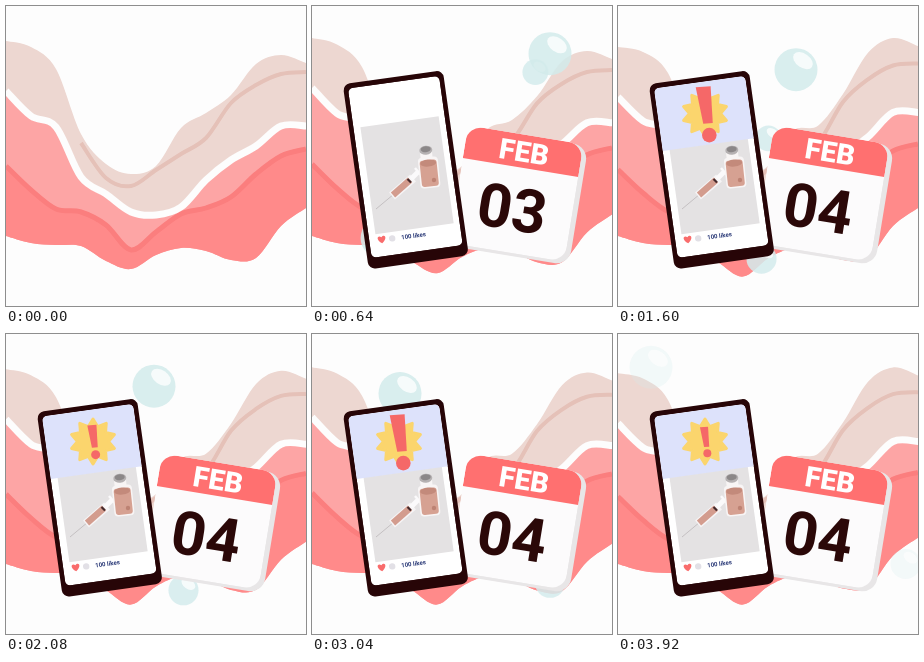
An HTML page for the animation above (4000 ms loop, 300x300 px).

```html
<!DOCTYPE html>
<html lang="en">
<head>
<meta charset="utf-8">
<title>Calendar and phone</title>
<style>
html, body { margin: 0; width: 100%; height: 100%; overflow: hidden; background: #fdfdfd; }
svg { display: block; width: 100vw; height: 100vh; }
text { font-family: Roboto, Arial, sans-serif; font-weight: 700; }
</style>
</head>
<body>
<svg viewBox="0 0 300 300">
  <defs>
    <clipPath id="screen"><rect x="-46" y="-88" width="92" height="171" rx="5"/></clipPath>
    <clipPath id="card"><rect x="-58" y="-61" width="117" height="119" rx="15"/></clipPath>
    <filter id="soft" x="-20%" y="-20%" width="140%" height="140%"><feGaussianBlur id="blur" stdDeviation="0"/></filter>
    <g id="bubble">
      <circle r="21.500" fill="#d3ebec" fill-opacity=".85"/>
      <ellipse cx="7" cy="-9" rx="11" ry="7" fill="#fff" opacity=".75" transform="rotate(35 7 -9)"/>
    </g>
  </defs>
  <rect width="300" height="300" fill="#fdfdfd"/>
  <g fill="none">
    <path id="beige" fill="#edd7d1"/>
    <path id="beigeLine" stroke="#e5c1b8" stroke-width="4"/>
    <path id="pink" fill="#fda5a5"/>
    <path id="coral" fill="#ff8a8a"/>
    <path id="coralLine" stroke="#fb7e7e" stroke-width="5"/>
    <path id="gap" stroke="#fdfdfd" stroke-width="7"/>
  </g>
  <use id="bubC" href="#bubble"/>
  <use id="bubB" href="#bubble"/>
  <use id="bubA" href="#bubble"/>

  <g id="cal">
    <g transform="translate(203.5 189) rotate(9.3)">
      <rect x="-56" y="-60" width="120" height="121" rx="15" fill="#e8e6e7"/>
      <g clip-path="url(#card)">
        <rect x="-58" y="-61" width="117" height="119" fill="#fcfbfc"/>
        <rect x="-58" y="-61" width="117" height="33" fill="#ff7070"/>
      </g>
      <text x="1.500" y="-34" font-size="28.500" text-anchor="middle" fill="#fff" style="font-weight:900">FEB</text>
      <text id="day" x="-1" y="35" font-size="60.500" text-anchor="middle" fill="#2b0808">03</text>
    </g>
  </g>

  <g id="phone">
    <g transform="translate(93.7 163.3) rotate(-8)">
      <rect x="-50.5" y="-93" width="101" height="187" rx="7" fill="#270507"/>
      <g clip-path="url(#screen)">
        <rect x="-46" y="-88" width="92" height="171" fill="#fff"/>
        <rect x="-39" y="-48" width="79" height="108" fill="#e4e2e3"/>
        <rect id="panel" x="-46" y="-88" width="92" height="63" fill="#dde2fb"/>
      </g>
      <path d="M-33.500 70C-40.500 65-36.500 60.500-33.500 64C-30.500 60.500-26.500 65-33.500 70" fill="#f96c6c"/>
      <circle cx="-23" cy="66.500" r="3.200" fill="#e2e0e6"/>
      <text x="-14" y="69" font-size="6.100" fill="#2b3a78">100 likes</text>
    </g>
    <g fill="none">
      <path d="M64 203L82 188" stroke="#c4c0c2" stroke-width="1"/>
      <path d="M80 190L101 172" stroke="#f6f4f5" stroke-width="9"/>
      <path d="M81 189L98 174" stroke="#d39c8e" stroke-width="6.500"/>
      <path d="M96.500 175.500L98 174" stroke="#43292b" stroke-width="5"/>
      <path d="M99 173L106 166" stroke="#fbfafb" stroke-width="5"/>
      <path d="M103 162L109 169" stroke="#fbfafb" stroke-width="2.500"/>
    </g>
    <g transform="rotate(-6 117 165)">
      <rect x="107" y="151" width="20" height="31" rx="4" fill="#f8f5f5"/>
      <rect x="110" y="143" width="12" height="10" fill="#f8f5f5"/>
      <rect x="108.500" y="154" width="17" height="26.500" rx="3" fill="#d6a192"/>
      <ellipse cx="117" cy="157" rx="8" ry="3.500" fill="#c38a7b"/>
      <circle cx="121" cy="174.500" r="2.200" fill="#bd8273"/>
      <ellipse cx="116" cy="144" rx="6.500" ry="4.500" fill="#b5b1b2"/>
      <ellipse cx="116" cy="143" rx="5" ry="3" fill="#8b8788"/>
    </g>
    <g id="badge">
      <path id="burst" fill="#fbd56d" stroke="#fbd56d" stroke-width="3" stroke-linejoin="round"/>
      <g id="mark" fill="#f56868">
        <path d="M-4.300-12.500L2.600-13L3.600 4L-.8 4.400Z"/>
        <circle cx="2" cy="9.600" r="3.400"/>
      </g>
    </g>
  </g>
</svg>
<script>
const LOOP = 4000, STEP = 80, GRID = 25;
const { sin, cos, exp, min, max, PI } = Math;
const $ = id => document.getElementById(id);
const set = (id, name, value) => $(id).setAttribute(name, value);
const clamp = v => max(0, min(1, v));
const ease = (a, b, t) => { const u = clamp((t - a) / (b - a)); return u * u * (3 - 2 * u); };

// Heights of each edge at even steps across the stage
const edge = (from, ...ys) => ys.map((y, i) => [from + i * GRID, y]);
const top0 = edge(0, 35, 41, 63, 128, 158, 168, 160, 122, 107, 89, 58, 49, 57);
const vein0 = edge(75, 137, 172, 180, 164, 148, 132, 97, 79, 68, 66);
const gap0 = edge(0, 85, 110, 121, 171, 188, 206, 209, 201, 174, 154, 140, 120, 120);
const fold0 = edge(0, 160, 184, 203, 206, 219, 244, 226, 208, 202, 191, 168, 150, 143);
const low0 = edge(0, 230, 237, 239, 240, 255, 263, 249, 242, 245, 254, 252, 220, 202);

// Smooth curve through evenly spaced points
function curve(p) {
  let d = '';
  for (let i = 0; i < p.length - 1; i++) {
    const a = p[max(0, i - 1)], b = p[i], c = p[i + 1], e = p[min(p.length - 1, i + 2)];
    const n = [b[0] + (c[0] - a[0]) / 6, b[1] + (c[1] - a[1]) / 6,
      c[0] - (e[0] - b[0]) / 6, c[1] - (e[1] - b[1]) / 6, ...c];
    d += 'C' + n.map(v => v.toFixed(2)).join(' ');
  }
  return d;
}
const line = p => 'M' + p[0] + curve(p);
const band = (a, b) => {
  const back = [...b].reverse();
  return line(a) + 'L' + back[0] + curve(back) + 'Z';
};

function waves(t) {
  const grow = ease(0, 1.2, t), sway = sin(3 * t) * grow;
  const bend = (pts, left, mid, right, center = 203) => pts.map(([x, y]) => [x, y
    + left * clamp(1 - x / 150) + right * clamp((x - 200) / 75)
    + mid * exp(-(((x - center) / 22) ** 2))]);
  const left = -6 * sway, right = 5 * sway - 12 * grow;
  const top = bend(top0, left, 13 * grow, right);
  const gap = bend(gap0, left, 0, right * .8);
  const fold = bend(fold0, left * .6, 0, right * .3);
  const low = bend(low0, 0, 8 * grow, 6 * (grow + sway), 130);
  set('beige', 'd', band(top, gap));
  set('beigeLine', 'd', line(bend(vein0, 0, 5 * grow, right * .5)));
  set('pink', 'd', band(gap, low));
  set('coral', 'd', band(fold, low));
  set('coralLine', 'd', line(fold));
  set('gap', 'd', line(gap));
}

function bubble(id, x, y, scale, opacity) {
  set(id, 'transform', `translate(${x} ${y}) scale(${scale})`);
  set(id, 'opacity', opacity);
}

function bubbles(t) {
  const fade = ease(.04, .4, t) * (1 - ease(3.6, 4.1, t));
  const arc = sin(t * PI / 4);
  bubble('bubA', 278 - 62.5 * t, 32 + 30 * arc + 11 * cos((t - 1.15) / 2.2 * 2 * PI), 1, fade);
  bubble('bubB', 16 + 69 * t + 18 * arc, 212 + 4 * t + 36 * arc, 1 - .3 * ease(.3, 1.5, t), fade);
  bubble('bubC', 272 - 76 * t, 22 + 69 * t, .6, fade * (1 - ease(1.8, 2.1, t)));
}

function enter(id, dx, dy, gain, t) {
  const p = ease(.08, .56, t), rest = 1 - p;
  set(id, 'transform', `translate(${dx * rest} ${dy * rest})`);
  set(id, 'opacity', clamp(p * gain));
  set(id, 'filter', rest > 0 ? 'url(#soft)' : 'none');
  set('blur', 'stdDeviation', 3 * rest);
}

function drawBurst(spikes) {
  const pts = [];
  for (let i = 0; i < spikes * 2; i++) {
    const a = i * PI / spikes, r = i % 2 ? 15.5 : 22.5;
    pts.push([(r * sin(a)).toFixed(2), (-r * cos(a)).toFixed(2)]);
  }
  set('burst', 'd', 'M' + pts.join('L') + 'Z');
}

function draw(ms) {
  const t = ms / 1000;
  waves(t);
  bubbles(t);
  enter('phone', -26, 22, 1.35, t);
  enter('cal', 60, -76, 1.8, t);

  $('day').textContent = t < 1.04 ? '03' : '04';
  const drop = ease(.96, 1.28, t);
  set('panel', 'y', -88 - 63 * (1 - drop));
  set('panel', 'opacity', drop);

  set('badge', 'transform', `translate(87 107.5) scale(${ease(1.12, 1.4, t)})`);
  const pulse = 1.6 + .56 * cos((t - 1.6) / 1.44 * 2 * PI);
  set('mark', 'transform', `translate(0 ${pulse * .4}) scale(${pulse})`);
}

drawBurst(10);
const start = performance.now();
function tick() {
  const ms = (performance.now() - start) % LOOP;
  draw(Math.floor(ms / STEP) * STEP);
  requestAnimationFrame(tick);
}
tick();
</script>
</body>
</html>
```
